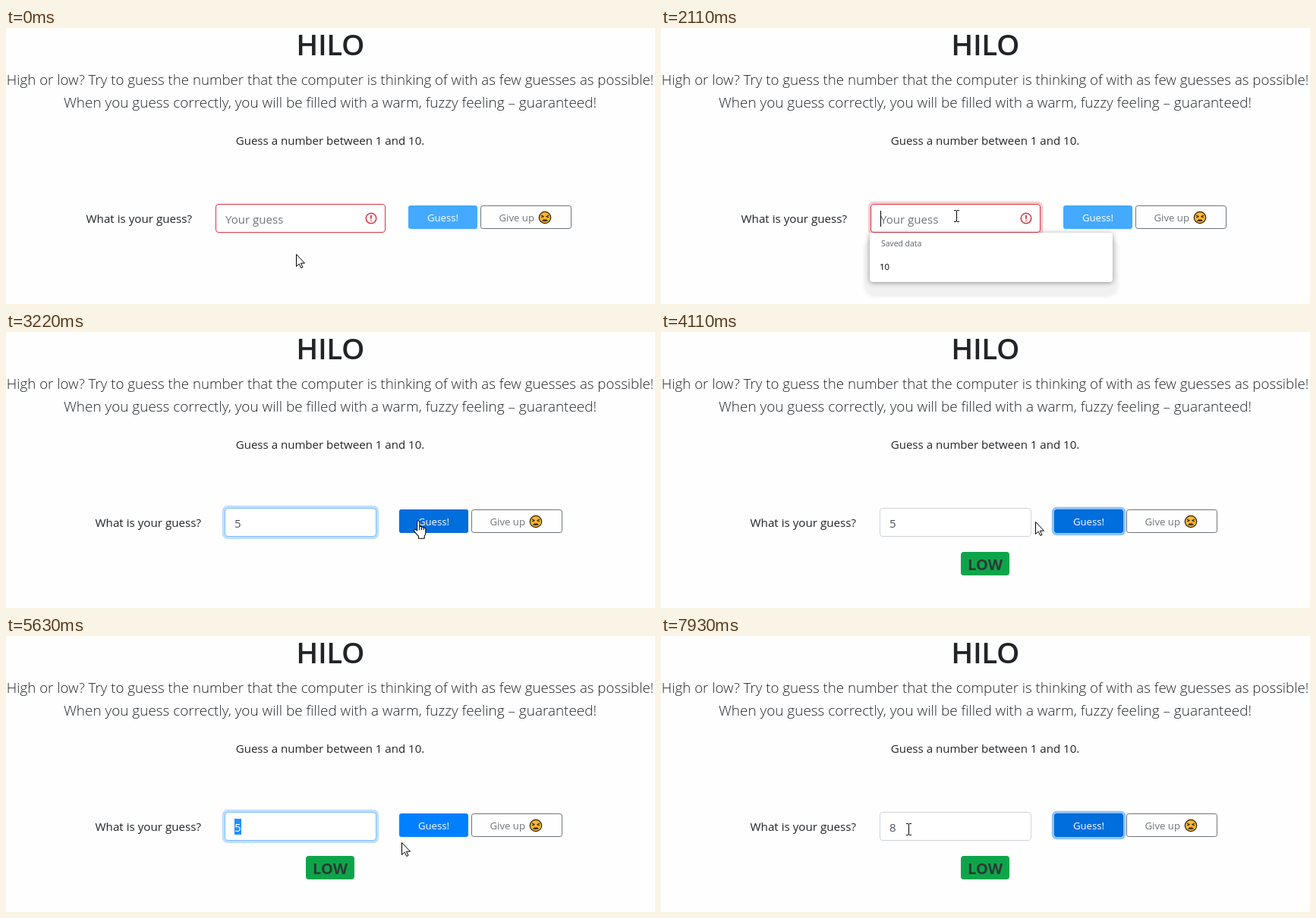
Animation, 855 px wide and 364 px high, one loop 8 s. Source, as an HTML page:

```html
<!DOCTYPE html>
<html lang="en">
<head>
<meta charset="utf-8">
<title>Hilo</title>
<style>
  html, body { margin: 0; width: 100%; height: 100%; overflow: hidden; background: #fefefe; }
  svg { display: block; width: 855px; height: 364px; }
  text { font: 15.05px "Open Sans", "Noto Sans", sans-serif; fill: #212529; white-space: pre; }
  .mid { text-anchor: middle; }
  .title { font-size: 38.6px; font-weight: 600; letter-spacing: -.4px; }
  .lead { font-size: 18.69px; font-weight: 300; }
  .lead.second { font-size: 18.93px; }
  .label { font-size: 15.2px; }
  .small { font-size: 13.2px; }
  .muted { fill: #6c757d; }
  .white { fill: #fff; }
  .low { font-size: 20px; font-weight: 700; fill: #2b3a35; }
  .ring { fill: none; stroke-width: 3.2px; }
  .line { fill: none; stroke: #000; }
  .halo { fill: #f1f1f1; filter: blur(1.5px); }
  .sheet { fill: #fff; filter: drop-shadow(0 1px 3px rgba(0,0,0,.4)); }
  .hint { font-size: 10.4px; fill: #5f6368; }
  .entry { font-size: 11.3px; fill: #000; }
  .cursor path { fill: #fff; stroke: #000; stroke-linejoin: round; }
  .cursor .line { fill: none; }
</style>
</head>
<body>
<svg viewBox="0 0 855 364">
  <text class="mid title" x="427.2" y="36">HILO</text>
  <text class="mid lead" x="427" y="74.7">High or low? Try to guess the number that the computer is thinking of with as few guesses as possible!</text>
  <text class="mid lead second" x="427" y="104.7">When you guess correctly, you will be filled with a warm, fuzzy feeling – guaranteed!</text>
  <text class="mid" x="427" y="154">Guess a number between 1 and 10.</text>

  <text id="label" class="label" y="257">What is your guess?</text>

  <g id="empty">
    <rect x="276.5" y="232.5" width="223" height="37" rx="3.5" fill="#fff" stroke="#dc3545"/>
    <text class="muted" x="289" y="258">Your guess</text>
    <g transform="translate(472 242) scale(1.5)" fill="none" stroke="#dc3545">
      <circle cx="6" cy="6" r="4.5"/>
      <path stroke-linejoin="round" d="M5.8 3.6h.4L6 6.5z"/>
      <circle cx="6" cy="8.2" r=".6" fill="#dc3545" stroke="none"/>
    </g>
    <g id="popup">
      <rect class="ring" x="274.4" y="230.4" width="227.2" height="41.2" rx="5.6" stroke="#dc3545" stroke-opacity=".25"/>
      <path class="line" d="M289.5 241v21"/>
      <rect class="halo" x="267" y="276" width="336" height="79" rx="16"/>
      <path class="sheet" d="M275 270h320v61a4 4 0 0 1-4 4h-312a4 4 0 0 1-4-4z"/>
      <text class="hint" x="290" y="288">Saved data</text>
      <text class="entry" x="288" y="318.5">10</text>
    </g>
  </g>

  <g id="filled">
    <rect x="288.5" y="232.5" width="199" height="37" rx="3.5" fill="#fff" stroke="#ced4da"/>
    <g id="fieldFocus">
      <rect x="288.5" y="232.5" width="199" height="37" rx="3.5" fill="none" stroke="#80bfff"/>
      <rect class="ring" x="286.4" y="230.4" width="203.2" height="41.2" rx="5.6" stroke="#0080ff" stroke-opacity=".25"/>
    </g>
    <rect id="selection" x="301" y="241" width="9" height="21" fill="#1e90ff"/>
    <text id="digit" x="301" y="258"></text>
  </g>

  <g id="buttons">
    <rect id="button" x="530" y="234" width="91" height="31" rx="3.2" fill="#0080ff"/>
    <rect id="hover" x="530.5" y="234.5" width="90" height="30" rx="2.7" fill="#006edc" stroke="#0066cc"/>
    <rect id="buttonFocus" class="ring" x="528.4" y="232.4" width="94.2" height="34.2" rx="4.8" stroke="#8cc4ff"/>
    <text class="mid small white" x="575.5" y="255">Guess!</text>
    <rect x="625.5" y="234.5" width="119" height="30" rx="2.7" fill="none" stroke="#6c757d"/>
    <text class="small muted" x="649.5" y="255">Give up</text>
    <g transform="translate(710 250)" stroke="#2a2016" stroke-linecap="round" stroke-linejoin="round">
      <circle r="7.7" fill="#fdb62f" stroke-width="1.2"/>
      <path fill="none" stroke-width="1.1" d="M-4.6-3l2.8 1.7-2.8 1.1M4.6-3L1.8-1.3 4.6-.2"/>
      <path fill="#2a2016" stroke-width=".8" d="M-3.4 4.6l1.7-2 1.7.7 1.7-.7 1.7 2-1.7-.5L0 5l-1.7-.9z"/>
    </g>
  </g>

  <g id="badge">
    <rect x="395" y="290" width="64" height="31" rx="4" fill="#0ea54a"/>
    <text class="mid low" x="427" y="313.5">LOW</text>
  </g>

  <g id="arrow" class="cursor"><path d="M.5.5v16l3.7-3.4 2.6 5.4 2.2-1-2.5-5.3h5z"/></g>
  <g id="beam" class="cursor"><path class="line" d="M-3.5-7.5h3m1 0h3M0-7V7M-3.5 7.5h3m1 0h3"/></g>
  <g id="hand" class="cursor">
    <g transform="scale(1.03 1.08)">
      <path d="M4.6 13V2.2a1.5 1.5 0 0 1 3 0V8q1.6-.8 2.6.5 1.7-.7 2.6.7 2.2-.3 2.6 1.6v4.4q0 2.2-1.6 4.3v2.9H6.2v-2.6L1.2 14.2q-1.2-2 .4-2.7 1.4-.3 3 1.5z"/>
      <path class="line" d="M7.6 8v4.2M10.2 8.6v3.6M12.8 9.2v3"/>
    </g>
  </g>
</svg>
<script>
const LOOP = 8000;
const $ = id => document.getElementById(id);
const at = (cursor, x, y) => ({ cursor, x, y });

// Each step keeps everything it does not mention from the step before.
const steps = [
  [0, { ...at('arrow', 382, 298), digit: '', popup: 0, field: 0, ring: 0, hover: 0, selected: 0, badge: 0, fill: '#43aaff' }],
  [450, at('beam', 389.5, 260)],
  [600, at('beam', 389.5, 248)],
  [2110, { popup: 1 }],
  [2500, { digit: '5', field: .6, popup: 0, fill: '#1a90ff' }],
  [2620, { ...at('beam', 394.5, 250), field: 1, fill: '#0080ff' }],
  [2740, at('beam', 417.5, 254)],
  [2860, at('beam', 458.5, 257)],
  [2980, at('arrow', 498, 256)],
  [3100, { ...at('hand', 526, 250), hover: .6 }],
  [3220, { ...at('hand', 537, 248), hover: 1 }],
  [3340, { field: 0, ring: 1, badge: 1 }],
  [4110, at('arrow', 493, 250)],
  [4260, at('beam', 430.5, 264)],
  [4380, at('beam', 382.5, 258)],
  [4660, at('beam', 345.5, 253)],
  [4810, { ...at('beam', 284.5, 254), selected: 1, field: .25, ring: .7, hover: .85 }],
  [4930, { ...at('beam', 203.5, 260), field: 1, ring: 0, hover: 0 }],
  [5330, at('arrow', 269, 251)],
  [5480, at('arrow', 441, 276)],
  [5630, at('arrow', 521, 272)],
  [5780, { ...at('hand', 545, 246), hover: 1 }],
  [6300, { digit: '8', selected: 0 }],
  [6830, { field: .4, ring: .6 }],
  [6950, { field: 0, ring: 1 }],
  [7230, at('hand', 513, 256)],
  [7380, at('beam', 424.5, 266)],
  [7510, at('beam', 341.5, 268)],
  [7660, at('beam', 334.5, 264)],
  [7780, at('beam', 329.5, 260)],
  [7930, at('beam', 326.5, 255)],
];

const show = (id, on) => $(id).style.display = on ? '' : 'none';
const fade = (id, amount) => $(id).style.opacity = amount;

function draw(time) {
  const s = Object.assign({}, ...steps.filter(([start]) => start <= time).map(([, change]) => change));
  const filled = s.digit !== '';
  show('empty', !filled);
  show('filled', filled);
  show('popup', s.popup);
  show('badge', s.badge);
  show('selection', s.selected);
  fade('fieldFocus', s.field);
  fade('buttonFocus', s.ring);
  fade('hover', s.hover);
  $('digit').textContent = s.digit;
  $('digit').style.fill = s.selected ? '#fff' : '#495057';
  $('button').style.fill = s.fill;
  $('label').setAttribute('x', filled ? 117.5 : 105.5);
  $('buttons').setAttribute('transform', `translate(${filled ? -12 : 0} 0)`);
  for (const kind of ['arrow', 'beam', 'hand']) show(kind, kind === s.cursor);
  $(s.cursor).setAttribute('transform', `translate(${s.x} ${s.y})`);
}

const start = performance.now();
function tick() {
  draw((performance.now() - start) % LOOP);
  requestAnimationFrame(tick);
}
tick();
</script>
</body>
</html>
```
